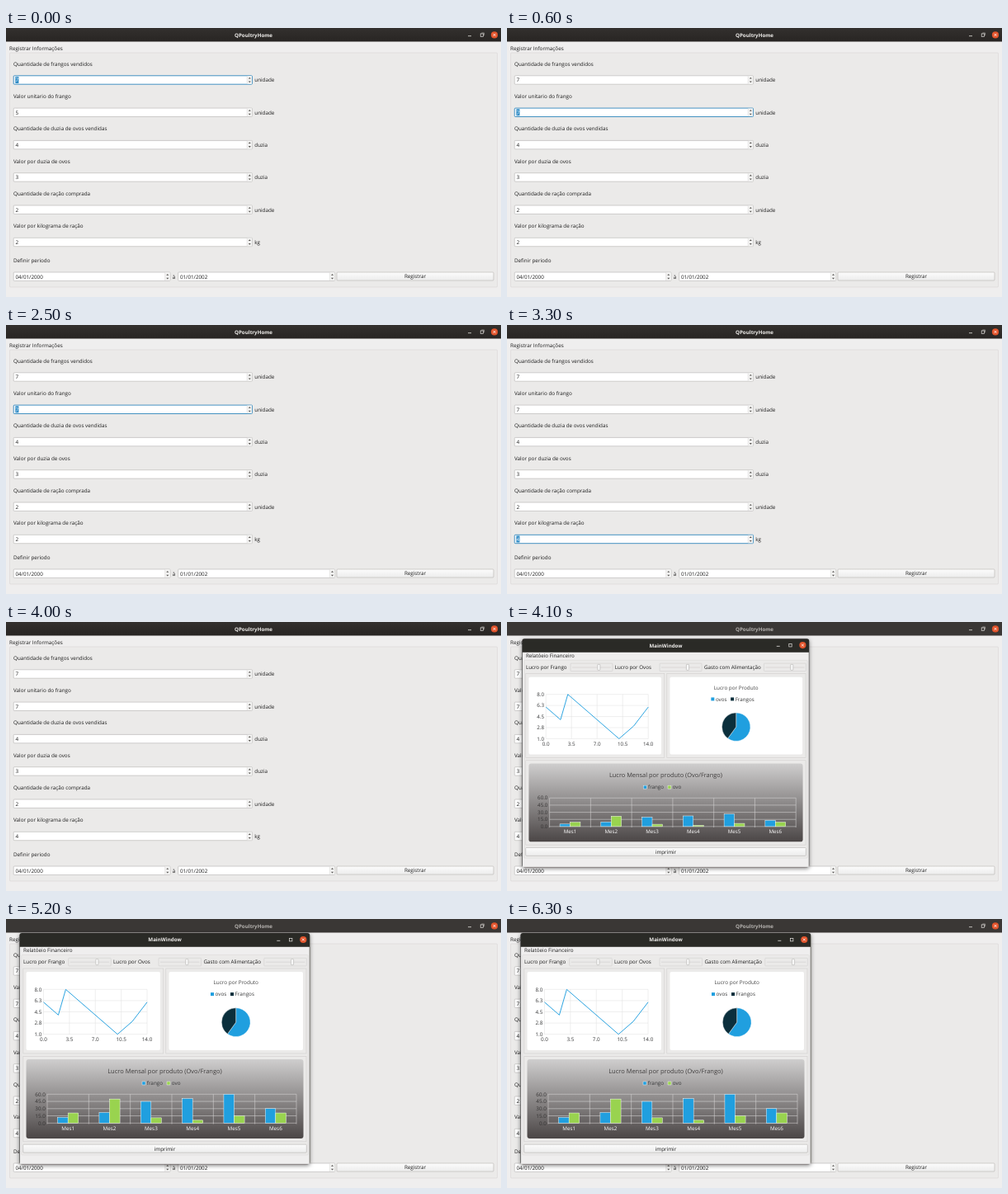
Animation, 600 px wide and 326 px high, one loop 6600 ms. Source, as an HTML page:

```html
<!DOCTYPE html>
<html lang="pt">
<head>
<meta charset="utf-8">
<title>QPoultryHome</title>
<style>
html, body { margin: 0; width: 100%; height: 100%; overflow: hidden; background: #efeeee; }
svg { display: block; width: 100%; height: 100%; }
text { font: 500 6.3px "Open Sans", "Noto Sans", sans-serif; fill: #1c1c1c; text-rendering: geometricPrecision; }
</style>
</head>
<body>
<svg id="stage" viewBox="0 0 600 326">
  <defs>
    <linearGradient id="button" x2="0" y2="1">
      <stop stop-color="#fcfcfc"/><stop offset="1" stop-color="#ececec"/>
    </linearGradient>
    <linearGradient id="panel" x2="0" y2="1">
      <stop stop-color="#cfcece"/><stop offset="1" stop-color="#4b4646"/>
    </linearGradient>
    <linearGradient id="bar" x2="0" y2="1">
      <stop stop-color="#33302e"/><stop offset="1" stop-color="#282523"/>
    </linearGradient>
    <filter id="shadow" x="-10%" y="-10%" width="120%" height="125%">
      <feDropShadow dx="0" dy="1.5" stdDeviation="2.6" flood-opacity=".5"/>
    </filter>
  </defs>
</svg>
<script>
const NS = "http://www.w3.org/2000/svg";
const LOOP = 6600, STEP = 100;
const BLUE = "#209fdf", GREEN = "#99d34f", NAVY = "#0b2f3c", FOCUS = "#308cc6";
const stage = document.getElementById("stage");

function add(parent, tag, attrs) {
  const node = document.createElementNS(NS, tag);
  for (const key in attrs) node.setAttribute(key, attrs[key]);
  return parent.appendChild(node);
}
const group = (parent, attrs) => add(parent, "g", attrs);
const rect = (parent, x, y, width, height, attrs) =>
  add(parent, "rect", { x, y, width, height, ...attrs });
const path = (parent, d, stroke, width = 0.6) =>
  add(parent, "path", { d, stroke, "stroke-width": width, fill: "none" });

// y is the middle of the line of text
function label(parent, x, y, words, { anchor = "start", size = 6.3, fill = "#1c1c1c", weight = 500 } = {}) {
  const node = add(parent, "text", { x, y: y + size * 0.35, "text-anchor": anchor });
  node.style.fontSize = size + "px";
  node.style.fontWeight = weight;
  node.style.fill = fill;
  node.textContent = words;
  return node;
}

function windowButtons(parent, right, y, restored) {
  path(parent, `M${right - 32} ${y + 1.3}h4`, "#e4e2df", 0.8);
  rect(parent, right - 16.8, y - 1.5, 3.4, 3.4, { fill: "none", stroke: "#e4e2df", "stroke-width": 0.7 });
  if (restored) path(parent, `M${right - 15.6} ${y - 2.4}h3.2v3.2`, "#e4e2df", 0.5);
  add(parent, "circle", { cx: right, cy: y, r: 4.1, fill: "#e2542c" });
  path(parent, `M${right - 1.5} ${y - 1.5}l3 3m0-3l-3 3`, "#fff", 0.8);
}

function pushButton(parent, x, y, width, words) {
  rect(parent, x, y, width, 10, { rx: 1, fill: "url(#button)", stroke: "#b5b3b1", "stroke-width": 0.6 });
  label(parent, x + width / 2, y + 5.1, words, { anchor: "middle" });
}

function spinBox(parent, x, y, width, words) {
  const right = x + width;
  const frame = rect(parent, x, y - 5.2, width, 10.4, { rx: 0.9, fill: "#fff", "stroke-width": 0.6 });
  rect(parent, right - 6.2, y - 4.8, 5.8, 9.6, { fill: "#f3f3f2" });
  path(parent, `M${right - 6.3} ${y - 4.8}v9.6`, "#d2d0cf", 0.5);
  for (const side of [-1, 1])
    add(parent, "path", { d: `M${right - 4.7} ${y + side * 1.5}h3l-1.5 ${side * 1.8}z`, fill: "#55524f" });
  const mark = rect(parent, x + 2.1, y - 4, 4.1, 8, { fill: FOCUS });
  const text = label(parent, x + 2.2, y + 0.1, words);
  function set(value, focused) {
    text.textContent = value;
    text.style.fill = focused ? "#fff" : "#1c1c1c";
    mark.setAttribute("visibility", focused ? "visible" : "hidden");
    frame.setAttribute("stroke", focused ? "#2f86bc" : "#b3b1af");
    frame.setAttribute("stroke-width", focused ? 0.9 : 0.6);
  }
  set(words, false);
  return set;
}

function buildForm() {
  const form = group(stage);
  rect(form, 0, 0, 600, 326, { fill: "#efeeee" });
  const bar = rect(form, 0, 0, 600, 16.5, { fill: "url(#bar)" });
  const title = label(form, 300, 8.6, "QPoultryHome", { anchor: "middle", size: 6.2, weight: 700, fill: "#f0eeec" });
  windowButtons(form, 592, 8.4, true);
  label(form, 4, 25, "Registrar Informações");
  rect(form, 4.5, 30, 591, 284, { rx: 1, fill: "#ebeae9", stroke: "#d8d6d5", "stroke-width": 0.6 });

  const rows = [
    ["Quantidade de frangos vendidos", "unidade", 7],
    ["Valor unitario do frango", "unidade", 5],
    ["Quantidade de duzia de ovos vendidas", "duzia", 4],
    ["Valor por duzia de ovos", "duzia", 3],
    ["Quantidade de ração comprada", "unidade", 2],
    ["Valor por kilograma de ração", "kg", 2]
  ];
  const fields = rows.map(([name, unit, value], i) => {
    const y = 63 + i * 39.3;
    label(form, 9, y - 19.6, name);
    label(form, 301.3, y + 0.1, unit);
    return spinBox(form, 9.2, y, 289.3, value);
  });

  label(form, 9, 282, "Definir periodo");
  spinBox(form, 9.2, 301.2, 189.8, "04/01/2000");
  label(form, 203.5, 301.3, "à", { anchor: "middle" });
  spinBox(form, 208.7, 301.2, 190, "01/01/2002");
  pushButton(form, 401, 296, 190, "Registrar");

  return { fields, setActive(active) {
    bar.setAttribute("fill", active ? "url(#bar)" : "#3a3735");
    title.style.fill = active ? "#f0eeec" : "#b5b2af";
  } };
}

function lineChart(parent) {
  rect(parent, 24.5, 64, 162.5, 95, { rx: 2, fill: "#fff" });
  const px = v => 45.5 + v * 125.5 / 14;
  const py = v => 139.7 - (v - 1) * 54.4 / 7;
  for (let i = 0; i < 5; i++) {
    const x = 3.5 * i, y = 1 + 1.75 * i;
    path(parent, `M45.5 ${py(y)}H171M${px(x)} 85.3V139.7`, "#dedede", 0.5);
    label(parent, 43.3, py(y), (Math.round(y * 10 + 1e-6) / 10).toFixed(1), { anchor: "end", fill: "#353637" });
    label(parent, px(x), 146, x.toFixed(1), { anchor: "middle", fill: "#353637" });
  }
  const points = [[0, 6], [2, 4], [3, 8], [10, 1], [12, 3], [14, 6]];
  path(parent, "M" + points.map(([x, y]) => px(x) + " " + py(y)).join("L"), BLUE, 0.95);
}

function pieChart(parent) {
  rect(parent, 197.5, 64, 162.5, 95, { rx: 2, fill: "#fff" });
  label(parent, 278.7, 77, "Lucro por Produto", { anchor: "middle", size: 6.4, fill: "#454545" });
  rect(parent, 248, 89.1, 4, 4, { fill: BLUE });
  label(parent, 253.6, 91, "ovos", { fill: "#353637" });
  rect(parent, 272, 89.1, 4, 4, { fill: NAVY });
  label(parent, 277.6, 91, "Frangos", { fill: "#353637" });
  const cx = 278.7, cy = 125.2, r = 17.4, angle = 0.6 * 2 * Math.PI;
  const x = cx + r * Math.sin(angle), y = cy - r * Math.cos(angle);
  const slice = (d, fill) => add(parent, "path", { d, fill, stroke: "#fff", "stroke-width": 0.4 });
  slice(`M${cx} ${cy}V${cy - r}A${r} ${r} 0 1 1 ${x} ${y}Z`, BLUE);
  slice(`M${cx} ${cy}L${x} ${y}A${r} ${r} 0 0 1 ${cx} ${cy - r}Z`, NAVY);
}

function barChart(parent) {
  const left = 50, right = 352, base = 247.3, height = 35, slot = (right - left) / 6;
  rect(parent, 24.5, 170, 336, 96, { rx: 3, fill: "url(#panel)" });
  label(parent, 192.5, 184, "Lucro Mensal por produto (Ovo/Frango)", { anchor: "middle", size: 7.5, fill: "#403e3e" });
  rect(parent, 165, 197, 4, 4, { fill: BLUE, stroke: "#fff", "stroke-width": 0.4 });
  label(parent, 170.8, 199, "frango", { fill: "#353637" });
  rect(parent, 195, 197, 4, 4, { fill: GREEN, stroke: "#fff", "stroke-width": 0.4 });
  label(parent, 200.8, 199, "ovo", { fill: "#353637" });
  for (let i = 0; i < 5; i++) {
    const y = base - i * height / 4;
    path(parent, `M${left} ${y}H${right}`, "#d8d6d6", 0.55);
    label(parent, 47.8, y, (15 * i).toFixed(1), { anchor: "end", fill: "#353333" });
  }
  for (let i = 0; i < 7; i++)
    path(parent, `M${left + i * slot} ${base - height}V${base + 1.2}`, "#d8d6d6", 0.55);

  const sets = [[12, 22, 45, 51, 60, 30], [21, 50, 11, 6, 15, 21]];
  const bars = [];
  sets.forEach((values, s) => values.forEach((value, i) => {
    const x = left + slot * (i + 0.25 + s * 0.25);
    const node = rect(parent, x, base, slot / 4, 0, { fill: s ? GREEN : BLUE, stroke: "#fff", "stroke-width": 0.45 });
    bars.push({ node, full: value / 60 * height });
  }));
  for (let i = 0; i < 6; i++)
    label(parent, left + slot * (i + 0.5), 253.3, "Mes" + (i + 1), { anchor: "middle", fill: "#fff" });

  return grow => bars.forEach(({ node, full }) => {
    node.setAttribute("y", base - full * grow);
    node.setAttribute("height", full * grow);
  });
}

function slider(parent, x, handle) {
  rect(parent, x, 47.3, 51.5, 9.6, { rx: 0.8, fill: "#ebeae9", stroke: "#cbc9c8", "stroke-width": 0.5 });
  path(parent, `M${x + 2} 52.2h47.5`, "#d5d3d2", 0.8);
  rect(parent, handle - 1.6, 48.6, 3.2, 7, { rx: 0.6, fill: "#f8f8f8", stroke: "#aaa8a6", "stroke-width": 0.5 });
}

function buildReport() {
  const report = group(stage);
  const frame = group(report, { filter: "url(#shadow)" });
  rect(frame, 16.3, 17, 352, 280.3, { rx: 3, fill: "#2c2927" });
  rect(report, 16.8, 33.8, 351, 263.1, { fill: "#efeeee" });
  label(report, 192.5, 25.3, "MainWindow", { anchor: "middle", size: 6.2, weight: 700, fill: "#f0eeec" });
  windowButtons(report, 360.3, 25, false);
  label(report, 21, 38.2, "Relatóeio Financeiro");
  rect(report, 18.7, 43.5, 347.5, 242.5, { rx: 1, fill: "#ebeae9", stroke: "#d8d6d5", "stroke-width": 0.5 });
  label(report, 21, 52.2, "Lucro por Frango");
  slider(report, 75.7, 110.4);
  label(report, 130, 52.2, "Lucro por Ovos");
  slider(report, 185, 219.3);
  label(report, 239.5, 52.2, "Gasto com Alimentação");
  slider(report, 312.8, 347);
  for (const [x, y, w, h] of [[20.8, 60, 170, 103], [193.8, 60, 170.2, 103], [20.8, 166.3, 343.2, 103.5]])
    rect(report, x, y, w, h, { fill: "none", stroke: "#d0cecd", "stroke-width": 0.6 });
  lineChart(report);
  pieChart(report);
  const setBars = barChart(report);
  pushButton(report, 20.7, 273.2, 343.6, "imprimir");
  return { report, setBars };
}

const { fields, setActive } = buildForm();
const { report, setBars } = buildReport();
const clamp = v => Math.min(1, Math.max(0, v));
const outExpo = p => p >= 1 ? 1 : 1 - 2 ** (-10 * p);
const outQuart = p => 1 - (1 - p) ** 4;

function draw(time) {
  // the screen is refreshed ten times a second
  const t = Math.floor((time % LOOP) / STEP) * STEP;
  const focus = t < 200 ? 0 : t < 2600 ? 1 : t < 3700 ? 5 : -1;
  fields[0](7, focus === 0);
  fields[1](t < 200 ? 5 : t < 400 ? 6 : 7, focus === 1);
  fields[5](t < 2600 ? 2 : t < 2800 ? 3 : 4, focus === 5);

  const open = t > 4000;
  setActive(!open);
  report.setAttribute("visibility", open ? "visible" : "hidden");
  if (open) {
    const scale = outExpo((t - 4003) / 150);
    report.setAttribute("transform", `translate(192.3 297.3) scale(${scale}) translate(-192.3 -297.3)`);
    setBars(outQuart(clamp((t - 3966) / 1000)));
  }
}

const start = performance.now();
function tick() {
  draw(performance.now() - start);
  requestAnimationFrame(tick);
}
tick();
</script>
</body>
</html>
```
